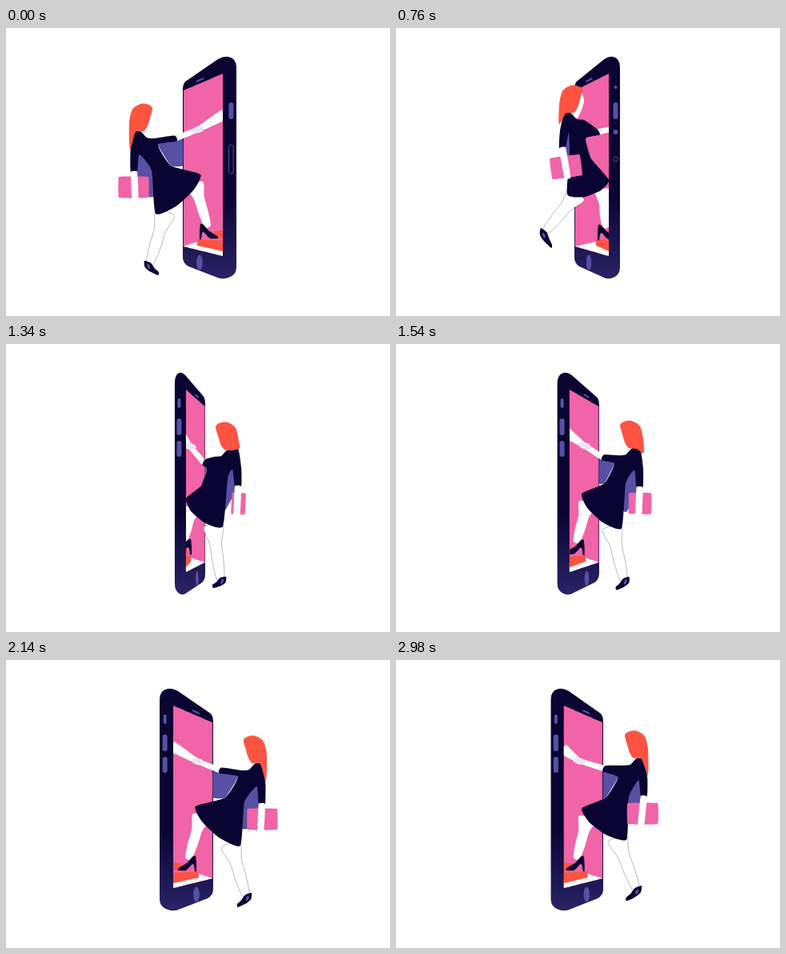
Write an HTML page with a canvas that moves like this. It is 480x360 px and loops after 3 s.

```html
<!DOCTYPE html>
<html>
<head>
<meta charset="utf-8">
<style>
html, body { margin: 0; width: 100%; height: 100%; overflow: hidden; background: #fff; }
canvas { display: block; }
</style>
</head>
<body>
<canvas id="stage" width="480" height="360"></canvas>
<script>
const ctx = document.getElementById('stage').getContext('2d');
const NAVY = '#0a0433', PINK = '#f164a7', RED = '#ff5341', PURPLE = '#5750a3', WHITE = '#fff';
const LOOP = 3000, FLIP = 1120;

// Key joints, facing right. phone: face left, face right, side right, step left.
const pulled = {
  phone: [221, 271, 288, 239], head: [168, 110], tail: [155, 152], back: [159, 131], cuff: [160, 180],
  waist: [182, 178], hem: [187, 232], knee: [243, 183], lap: [206, 172], chest: [190, 146],
  wrist: [212, 138], hand: [240, 127], puller: [273, 108], foot: [243, 247],
  heel: [173, 291], toe: [190, 309], bagL: [141, 199], bagR: [178, 199]
};
const stepping = {
  phone: [221, 270, 286, 241], head: [182, 102], tail: [168, 142], back: [172, 123], cuff: [173, 168],
  waist: [191, 170], hem: [193, 222], knee: [249, 186], lap: [221, 172], chest: [206, 147],
  wrist: [222, 135], hand: [254, 126], puller: [271, 112], foot: [246, 247],
  heel: [173, 280], toe: [192, 299], bagL: [156, 190], bagR: [194, 190]
};
const entering = {
  phone: [223, 266, 280, 250], head: [218, 87], tail: [204, 120], back: [210, 107], cuff: [208, 150],
  waist: [217, 160], hem: [214, 208], knee: [266, 190], lap: [243, 162], chest: [237, 138],
  wrist: [253, 130], hand: [275, 125], puller: [290, 118], foot: [253, 248],
  heel: [181, 250], toe: [194, 275], bagL: [194, 176], bagR: [231, 171]
};
const turning = {
  phone: [231, 255, 269, 249], head: [203, 113], tail: [188, 130], back: [190, 131], cuff: [190, 178],
  waist: [203, 168], hem: [209, 228], knee: [255, 193], lap: [236, 177], chest: [229, 156],
  wrist: [233, 148], hand: [250, 128], puller: [262, 114], foot: [249, 246],
  heel: [205, 291], toe: [221, 305], bagL: [181, 200], bagR: [198, 199]
};

const mapPose = (pose, fn) =>
  Object.fromEntries(Object.entries(pose).map(([k, v]) => [k, fn(v, k)]));
const moveX = (pose, fx) => mapPose(pose, ([x, y]) => [fx(x), y]);

const edgeOn = [232, 234, 248, 234];
const inside = { ...moveX(entering, x => x + 60), phone: edgeOn };
const hidden = { ...moveX(turning, x => 236 + (x - 180) * .5), phone: edgeOn };
const opening = {
  ...moveX(pulled, x => 246 - (246 - x) * .925), phone: [223, 268, 284, 239], tail: [160, 140]
};

// time, pose, easing power towards it (negative eases out)
const keys = [
  [0, pulled, 1], [70, pulled, 1], [480, stepping, 2], [760, entering, 1], [FLIP, inside, 1.15],
  [FLIP, hidden, 1], [1340, turning, -1.2], [1760, opening, -1.5], [2200, pulled, -2],
  [2600, pulled, 1], [3030, stepping, 2]
];

const mix = (a, b, u) => a.map((n, i) => n + (b[i] - n) * u);
const add = ([x, y], dx, dy) => [x + dx, y + dy];
const around = (p, offsets) => offsets.map(([dx, dy]) => add(p, dx, dy));

// Point at fraction u from p to q, pushed v pixels to the right of the direction.
function beside(p, q, u, v) {
  const dx = q[0] - p[0], dy = q[1] - p[1], d = Math.hypot(dx, dy) || 1;
  return add(mix(p, q, u), -dy / d * v, dx / d * v);
}

function poseAt(t) {
  const i = keys.findIndex(k => k[0] > t);
  const [t0, a] = keys[i - 1], [t1, b, p] = keys[i];
  const u = (t - t0) / (t1 - t0);
  const e = p > 0 ? u ** p : 1 - (1 - u) ** -p;
  return mapPose(a, (v, k) => mix(v, b[k], e));
}

// Closed spline through the points; k = 0 gives a polygon.
function shape(pts, fill, k = 0) {
  const n = pts.length, at = i => pts[(i + n) % n];
  ctx.beginPath();
  ctx.moveTo(...pts[0]);
  for (let i = 0; i < n; i++) {
    const [a, b, c, d] = [at(i - 1), at(i), at(i + 1), at(i + 2)];
    ctx.bezierCurveTo(b[0] + (c[0] - a[0]) * k, b[1] + (c[1] - a[1]) * k,
      c[0] - (d[0] - b[0]) * k, c[1] - (d[1] - b[1]) * k, c[0], c[1]);
  }
  ctx.fillStyle = fill;
  ctx.fill();
}

// Limb from p to q; half-widths are spaced evenly along it.
function limb(p, q, widths, fill, k = .05) {
  const side = s => widths.map((w, i) => beside(p, q, i / (widths.length - 1), s * w));
  shape([...side(1), ...side(-1).reverse()], fill, k);
}

function ellipse([x, y], rx, ry, fill, turn = 0) {
  ctx.beginPath();
  ctx.ellipse(x, y, rx, ry, turn, 0, 7);
  ctx.fillStyle = fill;
  ctx.fill();
}

function button(x, y, height, w, outline) {
  ctx.beginPath();
  ctx.roundRect(x - w / 2, y - height / 2, w, height, w / 2);
  ctx.fillStyle = ctx.strokeStyle = PURPLE;
  ctx.lineWidth = 1;
  outline ? ctx.stroke() : ctx.fill();
}

function drawPhone([l, s, r, step], t) {
  const w = s - l, c = (r - l) * .15;
  const drop = Math.min(1, w / 25);
  const top = 42 + 26 * drop, low = 306 - 8 * drop;
  ctx.beginPath();
  ctx.moveTo(l, top + 8);
  ctx.quadraticCurveTo(l, top, l + c * .6, top - 3);
  ctx.lineTo(r - c * 2.3, 39);
  ctx.quadraticCurveTo(r - c * 1.6, 35, r - c, 36);
  ctx.quadraticCurveTo(r, 38, r, 49);
  ctx.lineTo(r, 299);
  ctx.quadraticCurveTo(r, 309, r - c, 312);
  ctx.quadraticCurveTo(r - c * 1.8, 315, r - c * 2.6, 311);
  ctx.lineTo(l + c * .7, low);
  ctx.quadraticCurveTo(l, low - 4, l, low - 11);
  ctx.closePath();
  const glow = ctx.createLinearGradient(0, 210, 0, 314);
  glow.addColorStop(0, NAVY);
  glow.addColorStop(1, '#2a2366');
  ctx.fillStyle = glow;
  ctx.fill();

  // Screen, floor and two steps
  const x0 = l + w * .02, up = mix([step], [s], .68)[0];
  shape([[x0, 78], [s, 57], [s, 285], [x0, 273]], PINK);
  shape([[x0, 273], [step, 267], [s, 275], [s, 285]], WHITE);
  shape([[step, 264], [s, 266], [s, 279], [step, 272]], RED);
  shape([[up, 254], [s, 253], [s, 263], [up, 262]], RED);

  ellipse([l + w * .42, 293], w * .075, 9.5, PURPLE);
  ctx.beginPath();
  ctx.moveTo(l + w * .34, 67);
  ctx.lineTo(l + w * .52, 63);
  ctx.strokeStyle = PURPLE;
  ctx.lineWidth = 2;
  ctx.stroke();

  const x = s + (r - s) * .61;
  button(x, 103.5, 21, 6);
  if (t < FLIP) {
    const u = Math.max(0, Math.min(1, (t - 480) / 280));
    button(x, 164, 36 - 30 * u, 5.5, true);
    ellipse([x, 74], 2 * u, 2 * u, PURPLE);
    ellipse([x, 130], 3 * u, 3 * u, PURPLE);
  } else {
    button(x, 74, 12, 4);
    button(x, 131, 20, 6);
  }
}

function drawWoman(p) {
  const [l, s] = p.phone;
  const { head, back, cuff, waist, hem, knee, lap, chest, wrist, hand, heel, toe } = p;
  const armpit = add(mix(back, cuff, .55), 7, 0);
  const palm = add(mix(p.bagL, p.bagR, .5), 2, 14);
  const leg = [12, 7.5, 7, 4.5];

  ctx.save();
  ctx.beginPath();
  ctx.rect(0, 0, s, 360);
  ctx.clip();

  // Shadows behind the body
  shape([chest, wrist, [l, wrist[1]], [l, lap[1]], lap], PURPLE, .05);
  shape([add(armpit, -4, -6), add(armpit, 6, 0), add(waist, 4, 0), mix(waist, hem, .6),
    add(cuff, 16, 30), cuff], PURPLE, .05);

  // Standing leg and shoe
  limb(add(hem, 12, -1), add(heel, 7, 3), leg, WHITE, .12);
  ctx.strokeStyle = 'rgba(10,4,51,.4)';
  ctx.lineWidth = .7;
  ctx.stroke();
  shape([heel, beside(heel, toe, .3, -4), beside(heel, toe, .65, -3), add(toe, 1, -4), toe,
    beside(heel, toe, .6, 4), beside(heel, toe, .25, 5)], NAVY, .1);
  ellipse(beside(heel, toe, .35, 1), 1.6, 3.4, PURPLE, -.4);

  // Raised leg and pump
  limb(add(knee, -7, 12), add(p.foot, 9, 1), leg.map(w => w * .88), WHITE, .12);
  shape(around(p.foot, [[0, -2], [4, -1], [10, 6], [21, 13], [22, 16], [12, 16], [4, 8],
    [2, 10], [1, 17], [-1, 17], [-1, 7]]), NAVY, .08);

  // Reaching arms and clasped hands
  limb(p.puller, hand, [6.5, 3], WHITE);
  limb(wrist, hand, [3.5, 3], WHITE);
  ellipse(hand, 8, 4.2, '#e9e8f0', -.25);

  shape(around(head, [[12, -10], [17, 3], [14, 15], [8, 26], [0, 20], [6, 0]]), WHITE, .12);
  shape([back, add(mix(back, cuff, .5), -4, 0), add(cuff, -4, 0), add(cuff, 4, -1), armpit, waist,
    hem, beside(hem, knee, .35, 10), beside(hem, knee, .75, 9), knee, lap, chest,
    add(wrist, 1.5, 3.5), add(wrist, -1.5, -3.5),
    ...around(head, [[17, 28], [8, 27], [0, 19]])], NAVY, .09);

  limb(p.bagL, p.bagR, [13, 13], PINK, .025);
  limb(cuff, palm, [4, 4], WHITE);
  shape([...around(head, [[0, -15], [9, -14.5], [15, -10], [12, 2], [9, 12], [4, 19], [-6, 20]]),
    p.tail, ...around(head, [[-14, 9], [-10, -8]])], RED, .14);
  ctx.restore();
}

function draw(now) {
  const t = now % LOOP, pose = poseAt(t);
  ctx.setTransform(1, 0, 0, 1, 0, 0);
  ctx.fillStyle = WHITE;
  ctx.fillRect(0, 0, 480, 360);
  if (t >= FLIP) ctx.setTransform(-1, 0, 0, 1, 480, 0);
  drawPhone(pose.phone, t);
  drawWoman(pose);
}

const start = performance.now();
function frame() {
  draw(performance.now() - start);
  requestAnimationFrame(frame);
}
frame();
</script>
</body>
</html>
```
